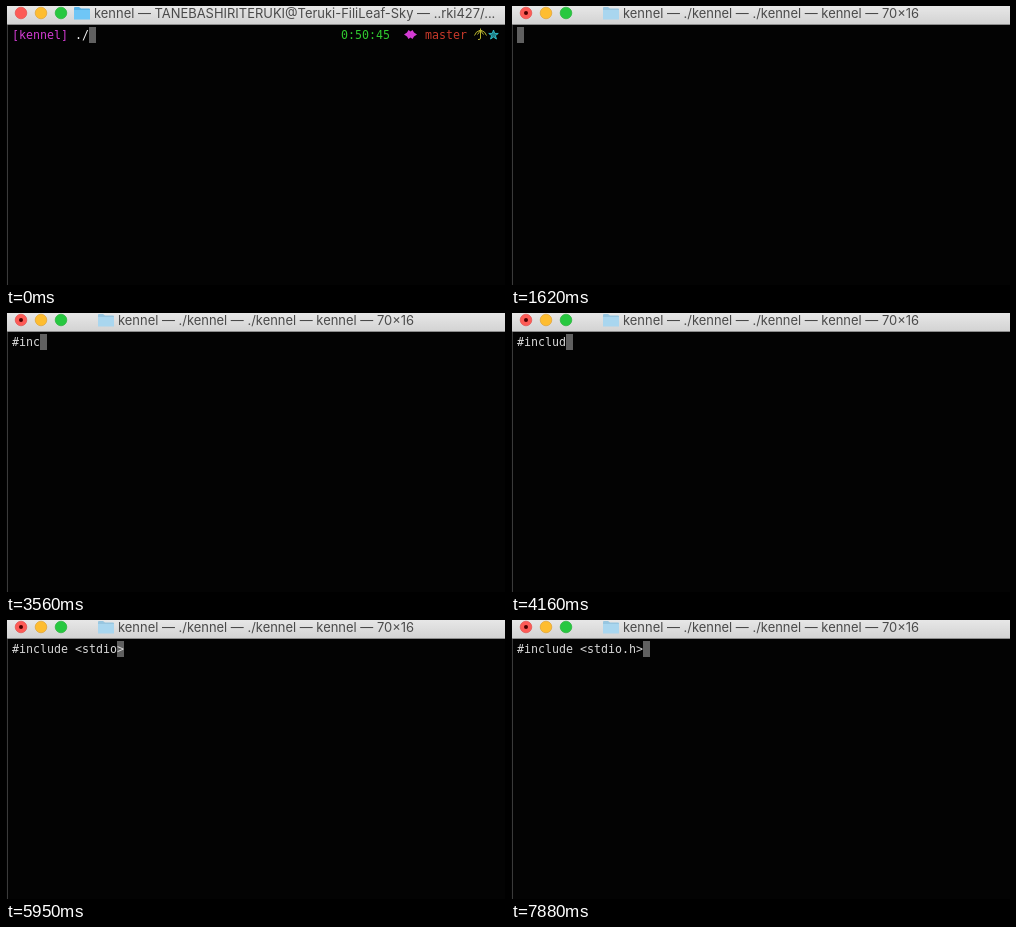
These frames come from a looping animation (499 by 279 pixels, 8000 ms). An HTML page with a canvas:

```html
<!DOCTYPE html>
<html lang="en">
<head>
<meta charset="utf-8">
<title>Terminal</title>
<style>
  html, body { margin: 0; width: 100%; height: 100%; overflow: hidden; background: #030303; }
  canvas { display: block; }
</style>
</head>
<body>
<canvas id="stage" width="499" height="279"></canvas>
<script>
const ctx = document.getElementById('stage').getContext('2d');
const LOOP = 8000, CELL = 7, ROW = 16, LEFT = 6, TOP = 21;
const ENTER = 1480, EDITOR = 1620;

// [start ms, line, cursor column]; the cursor defaults to the end of the line
const shellSteps = [
  [0, './'], [740, './k'], [890, './ke'], [1180, './kennel ']
];
const editorSteps = [
  [EDITOR, ''], [2820, '#'], [3120, '#i'], [3270, '#in'], [3560, '#inc'],
  [3860, '#inclu'], [4160, '#includ'], [4310, '#include'], [4450, '#include '],
  [4750, '#include <>'], [5050, '#include <>', 10], [5350, '#include <s>', 11],
  [5500, '#include <st>', 12], [5800, '#include <stdi>', 14],
  [5950, '#include <stdio>', 15], [6550, '#include <stdio,>', 16],
  [7000, '#include <stdio>', 15], [7140, '#include <stdio.>', 16],
  [7440, '#include <stdio.h>', 17], [7880, '#include <stdio.h>']
];

function stepAt(steps, t) {
  const [, line, column = line.length] = steps.filter(s => s[0] <= t).pop();
  return { line, column };
}

function rect(x, y, w, h, color) {
  ctx.fillStyle = color;
  ctx.fillRect(x, y, w, h);
}

function disc(x, y, r, color, edge) {
  ctx.beginPath();
  ctx.arc(x, y, r, 0, Math.PI * 2);
  ctx.fillStyle = color;
  ctx.fill();
  if (edge) {
    ctx.strokeStyle = edge;
    ctx.lineWidth = 0.7;
    ctx.stroke();
  }
}

function print(text, column, color) {
  ctx.font = '11.63px "DejaVu Sans Mono", monospace';
  ctx.fillStyle = color;
  [...text].forEach((ch, i) => ctx.fillText(ch, LEFT + (column + i) * CELL, 33));
}

function cursor(column, row) {
  rect(LEFT + column * CELL, TOP + row * ROW, CELL, ROW, '#606060');
}

function strokePath(d, color) {
  ctx.strokeStyle = color;
  ctx.lineWidth = 1;
  ctx.stroke(new Path2D(d));
}

function folder(x, color, tab) {
  ctx.fillStyle = tab;
  ctx.fill(new Path2D(`M${x} 13V2q0-1 1-1h4l2 1.5h8q1 0 1 1V13z`));
  rect(x, 4, 16, 9.5, color);
}

function titleBar(editing) {
  const shade = ctx.createLinearGradient(0, 0, 0, 18);
  shade.addColorStop(0, '#e7e7e7');
  shade.addColorStop(1, '#d3d3d3');
  rect(1, 0, 498, 18, shade);
  rect(1, 18, 498, 1, '#8c8c8c');

  disc(15, 7, 5.8, '#fd5b56', '#e2504c');
  disc(35, 7, 5.8, '#febd30', '#e0a334');
  disc(55, 7, 5.8, '#27c840', '#27b03a');
  if (editing) disc(15, 7, 2, '#4d0000');

  const x = editing ? 92 : 68;
  folder(x, editing ? '#a9d6ef' : '#6fc6f6', editing ? '#98c6e0' : '#54b1e6');
  ctx.font = '12.95px Inter, sans-serif';
  ctx.fillStyle = '#4a4a4a';
  ctx.fillText(editing
    ? 'kennel — ./kennel — ./kennel — kennel — 70×16'
    : 'kennel — TANEBASHIRITERUKI@Teruki-FiliLeaf-Sky — ..rki427/...', x + 20, 12);
}

function statusSymbols() {
  ctx.fillStyle = '#d23bd2';
  ctx.fill(new Path2D('M398 28.5l3-2 1.5-2.5 2 1.5 2-1.5 1.5 2.5 3 2-3 2-1.5 2.5-2-1.5-2 1.5-1.5-2.5z'));
  strokePath('M468.5 29.5q1-4 6-5.5q5 1.5 6 5.5M474.5 22.5V32q0 2-2.5 1.5M471.5 28.5l3-4 3 4', '#b8b32d');
  let star = '';
  for (let i = 0; i < 10; i++) {
    const a = i * Math.PI / 5 - Math.PI / 2, r = i % 2 ? 2 : 5;
    star += (i ? 'L' : 'M') + (487.5 + r * Math.cos(a)) + ' ' + (29 + r * Math.sin(a));
  }
  ctx.fillStyle = '#1f7f88';
  ctx.fill(new Path2D(star));
  strokePath(star + 'z', '#30b9c6');
}

function shell(t) {
  const { line, column } = stepAt(shellSteps, t);
  if (t >= ENTER) {
    cursor(0, 1);
    strokePath('M6 24.5H3.5V34.5H6M496 24.5H498.5V34.5H496', '#8f8f8f');
  } else {
    cursor(9 + column, 0);
  }
  print('[kennel]', 0, '#d23bd2');
  print(line, 9, '#f4f4f4');
  print('0:50:45', 47, '#30c92f');
  print('master', 59, '#c93a2b');
  statusSymbols();
}

function editor(t) {
  const { line, column } = stepAt(editorSteps, t);
  cursor(column, 0);
  print(line, 0, '#d8d8d8');
}

function draw(now) {
  const t = now % LOOP, editing = t >= EDITOR;
  rect(0, 0, 499, 279, '#030303');
  rect(1, 19, 1, 260, '#3a3a3a');
  titleBar(editing);
  (editing ? editor : shell)(t);
}

const start = performance.now();
function tick() {
  draw(performance.now() - start);
  requestAnimationFrame(tick);
}
tick();
</script>
</body>
</html>
```
